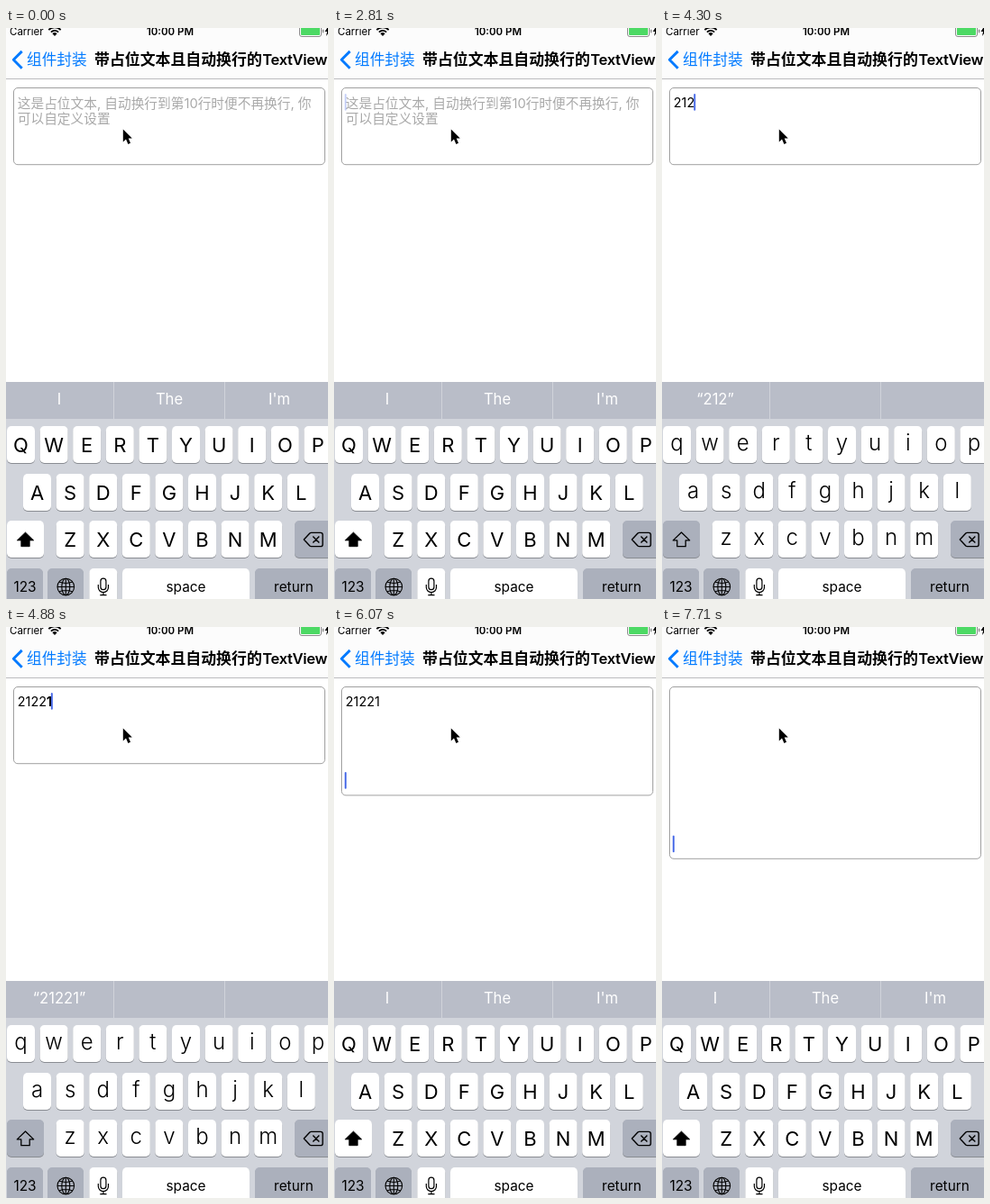
Recreate the animation shown at these times as an HTML page with a canvas. Size 357x634 px, loop 8 s.

```html
<!DOCTYPE html>
<html lang="zh">
<head>
<meta charset="utf-8">
<title>TextView</title>
<style>
html, body { margin: 0; width: 100%; height: 100%; overflow: hidden; background: #fff; }
canvas { display: block; width: 357px; height: 634px; }
</style>
</head>
<body>
<canvas id="stage"></canvas>
<script>
const W = 357, H = 634, LOOP = 8000;
const canvas = document.getElementById('stage');
const dpr = window.devicePixelRatio || 1;
canvas.width = W * dpr;
canvas.height = H * dpr;
const ctx = canvas.getContext('2d');

const BLUE = '#007aff', DARK_KEY = '#abb0bc', CARET = '#4a6ce8';
const LINE = 17.6, PITCH = 36.6;

// Each list holds [start time, value]; a value holds until the next start.
const caretAlpha = [[0, 0], [290, 1], [740, .3], [880, 0], [1180, .5], [1330, 1],
  [1770, .22], [1920, 0], [2220, 1], [2670, .3], [2820, 0], [2960, 1]];
const typed = [[0, ''], [3860, '2'], [4150, '21'], [4300, '212'], [4590, '2122'], [4880, '21221']];
const lineNo = [[0, 1], [5030, 2], [5320, 3], [5470, 4], [5770, 5], [6070, 6],
  [6520, 7], [6670, 8], [6970, 9], [7270, 10]];
const scroll = [[0, 0], [7420, 6], [7560, 15], [7710, LINE * 2]];
const lowerCase = [[0, false], [4000, true], [5180, false]];
const bubble = [[0, false], [3710, true], [3860, false]];
const freshDigit = [[0, false], [4880, true], [5030, false]];

function at(list, t) {
  let value = list[0][1];
  for (const [start, v] of list) if (t >= start) value = v;
  return value;
}

function setFont(size, weight = 400) {
  ctx.font = `${weight} ${size}px Inter, "Noto Sans CJK SC", "Noto Sans CJK", sans-serif`;
}

function text(str, x, y, size, color = '#000', weight = 400, align = 'left', spacing = 0) {
  setFont(size, weight);
  ctx.letterSpacing = spacing + 'px';
  ctx.textAlign = align;
  ctx.fillStyle = color;
  ctx.fillText(str, x, y);
  ctx.letterSpacing = '0px';
}

function box(x, y, w, h, r, color) {
  ctx.beginPath();
  ctx.roundRect(x, y, w, h, r);
  ctx.fillStyle = color;
  ctx.fill();
}

function path(d, x, y, { fill, stroke, width = 1 }) {
  const p = new Path2D(d);
  ctx.save();
  ctx.translate(x, y);
  ctx.lineJoin = 'round';
  if (stroke) {
    ctx.strokeStyle = stroke;
    ctx.lineWidth = width;
    ctx.stroke(p);
  }
  if (fill) {
    ctx.fillStyle = fill;
    ctx.fill(p);
  }
  ctx.restore();
}

function statusBar() {
  text('Carrier', 4, 8, 11.5);
  text('10:00 PM', 182, 8, 11.5, '#000', 600, 'center');
  ctx.strokeStyle = '#000';
  ctx.lineWidth = 1.8;
  for (const r of [5.6, 9.2]) {
    ctx.beginPath();
    ctx.arc(54, 8.5, r, -Math.PI * .76, -Math.PI * .24);
    ctx.stroke();
  }
  path('M0 1 L-2.6 -1.8 Q0 -4 2.6 -1.8 Z', 54, 8, { fill: '#000' });
  ctx.beginPath();
  ctx.roundRect(325.5, -2.5, 24, 12, 2.5);
  ctx.strokeStyle = '#8b8b8b';
  ctx.lineWidth = 1;
  ctx.stroke();
  box(327, -1, 21, 9, 1, '#4cd964');
  box(350.8, 1.5, 1.5, 4, .7, '#8b8b8b');
  path('M3 -3 L-1.5 4 H1 L0 9 L5 2 H2 Z', 355, 0, { fill: '#000' });
}

function header(t) {
  ctx.fillStyle = '#fcfcfc';
  ctx.fillRect(0, 0, W, 56);
  ctx.fillStyle = '#bcbcbe';
  ctx.fillRect(0, 56, W, 1);
  statusBar();
  path('M10.2 -9.4 L.8 0 L10.2 9.4', 7.5, 35.3, { stroke: BLUE, width: 2.9 });
  text('组件封装', 23, 41, 16.7, BLUE);
  text('带占位文本且自动换行的', 98, 41, 16.9, '#000', 600);
  text('TextView', 284.3, 41, 16.6, '#000', 600, 'left', -.35);
  if (at(bubble, t)) {
    path('M8 0 H60 Q68 0 68 8 V27 Q68 35 60 35 H26 L17 44 L8 35 Q0 35 0 27 V8 Q0 0 8 0 Z',
      8, 20, { fill: 'rgba(60,60,60,.28)' });
  }
}

function textView(t) {
  const line = at(lineNo, t), str = at(typed, t);
  const bottom = 151.7 + Math.max(0, line - 4) * LINE;
  ctx.save();
  ctx.beginPath();
  ctx.roundRect(8.5, 66.5, 345, bottom - 66.5, 4.5);
  ctx.strokeStyle = '#a0a0a0';
  ctx.lineWidth = 1;
  ctx.stroke();
  ctx.clip();
  if (str) {
    const y = 88 - at(scroll, t);
    text(str, 12.8, y, 14.4);
    if (at(freshDigit, t)) {
      const x = 12.8 + ctx.measureText(str.slice(0, -1)).width;
      text(str.slice(-1), x, y, 14.4, '#000', 700);
    }
  } else {
    text('这是占位文本, 自动换行到第10行时便不再换行, 你', 12.8, 88.5, 14.7, '#a9a9a9');
    text('可以自定义设置', 12.8, 106, 14.7, '#a9a9a9');
  }
  setFont(14.4);
  const caretX = 11.8 + (line === 1 ? ctx.measureText(str).width : 0);
  ctx.globalAlpha = at(caretAlpha, t);
  box(caretX, 73 + (line - 1) * LINE, 2, 18.8, 1, CARET);
  ctx.restore();
}

function pointer() {
  path('M0 0 V14 L3.2 11 L5.6 16.4 L8.2 15.2 L5.9 10 H10 Z', 129.8, 112.6,
    { stroke: '#fff', width: 2, fill: '#000' });
}

function suggestions(t, low) {
  ctx.fillStyle = '#b9bdc8';
  ctx.fillRect(0, 393, W, 41);
  ctx.fillStyle = '#d0d3da';
  ctx.fillRect(119, 393, 1, 41);
  ctx.fillRect(242, 393, 1, 41);
  const words = low ? [`“${at(typed, t)}”`] : ['I', 'The', 'I\'m'];
  words.forEach((word, i) => text(word, 59 + i * 122, 418, 16.6, '#fff', 400, 'center'));
}

function key(x, y, w, color = '#fff') {
  box(x, y + 1, w, 41, 5, '#898c92');
  box(x, y, w, 41, 5, color);
}

function letterRow(letters, x, y, low) {
  [...letters].forEach((ch, i) => {
    const left = x + i * PITCH;
    key(left, y, 31);
    if (low) text(ch.toLowerCase(), left + 15.5, y + 27, 24, '#000', 300, 'center');
    else text(ch, left + 15.5, y + 29, 22, '#000', 400, 'center');
  });
}

function deleteIcon() {
  path('M-10 0 L-3.5 -7 Q-2.8 -7.6 -2 -7.6 H8.5 Q10.8 -7.6 10.8 -5.4 V5.4 Q10.8 7.6 8.5 7.6 H-2 Q-2.8 7.6 -3.5 7 Z M0 -3.6 L7 3.6 M7 -3.6 L0 3.6',
    340.3, 568, { stroke: '#000', width: 1.4 });
}

function globeIcon() {
  ctx.strokeStyle = '#000';
  ctx.lineWidth = 1.1;
  for (const rx of [9.3, 4.5]) {
    ctx.beginPath();
    ctx.ellipse(66.3, 620.5, rx, 9.3, 0, 0, Math.PI * 2);
    ctx.stroke();
  }
  path('M0 -9.3 V9.3 M-9.3 0 H9.3 M-7.5 -5.4 Q0 -2.6 7.5 -5.4 M-7.5 5.4 Q0 2.6 7.5 5.4',
    66.3, 620.5, { stroke: '#000', width: 1.1 });
}

function micIcon() {
  ctx.beginPath();
  ctx.roundRect(104.9, 611.2, 6, 12.5, 3);
  ctx.strokeStyle = '#000';
  ctx.lineWidth = 1.2;
  ctx.stroke();
  path('M-5.6 -2.5 V.5 A5.6 5.6 0 0 0 5.6 .5 V-2.5 M0 6.2 V9 M-3.6 9.2 H3.6',
    107.9, 620.5, { stroke: '#000', width: 1.2 });
}

function keyboard(t) {
  const low = at(lowerCase, t);
  ctx.fillStyle = '#d1d4db';
  ctx.fillRect(0, 434, W, H - 434);
  suggestions(t, low);
  letterRow('QWERTYUIOP', 1, 442, low);
  letterRow('ASDFGHJKL', 19, 495, low);
  letterRow('ZXCVBNM', 55.6, 547, low);

  key(1, 547, 41, low ? DARK_KEY : '#fff');
  path('M0 -8.3 L9.2 .6 H4.7 V7.4 H-4.7 V.6 H-9.2 Z', 21.5, 568.3,
    { stroke: '#000', width: low ? 1.3 : .8, fill: low ? null : '#000' });
  key(320, 547, 41, DARK_KEY);
  deleteIcon();

  key(1, 600, 40, DARK_KEY);
  text('123', 21, 626, 15.4, '#000', 400, 'center');
  key(46, 600, 40, DARK_KEY);
  globeIcon();
  key(92.3, 600, 31);
  micIcon();
  key(129, 600, 141);
  text('space', 199.5, 626, 15.4, '#000', 400, 'center');
  key(276, 600, 86, DARK_KEY);
  text('return', 319, 626, 15.4, '#000', 400, 'center');
}

function draw(now) {
  const t = now % LOOP;
  ctx.setTransform(dpr, 0, 0, dpr, 0, 0);
  ctx.fillStyle = '#fff';
  ctx.fillRect(0, 0, W, H);
  header(t);
  textView(t);
  pointer();
  keyboard(t);
}

let origin = null;
function tick(now) {
  if (origin === null) origin = now;
  draw(now - origin);
  requestAnimationFrame(tick);
}
requestAnimationFrame(tick);
</script>
</body>
</html>
```
